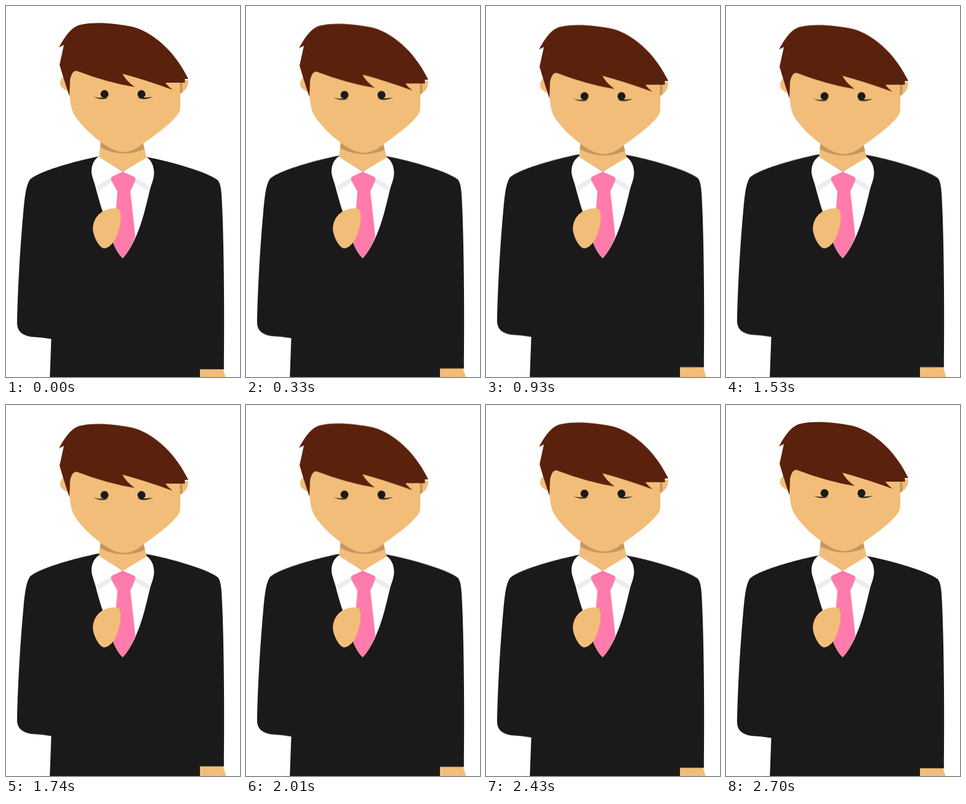
An HTML page for the animation above (3.6 s loop, 380 by 600 pixels).

```html
<!DOCTYPE html>
<html lang="en">
<head>
<meta charset="utf-8">
<title>Man in a suit</title>
<style>
  html, body { margin: 0; width: 100%; height: 100%; overflow: hidden; background: #fff; }
  svg { display: block; width: 380px; height: 600px; }
  .skin { fill: #f2bd78; }
  .shade { fill: #c29860; }
  .dark { fill: #1a1a1a; }
  .hair { fill: #5a210c; }
  .tie { fill: #ff7bac; }
  .fold { fill: #eeeded; }
  .jacket, .head { animation: breathe 3600ms infinite; }
  .jacket { --shift: -3.4px; }
  .head { --shift: 3.3px; }

  @keyframes breathe {
    0% { transform: translateY(0); animation-timing-function: cubic-bezier(.3, 0, .5, 1); }
    25.833% { transform: translateY(var(--shift)); animation-timing-function: linear; }
    42.5% { transform: translateY(var(--shift)); animation-timing-function: cubic-bezier(.35, 0, .75, .85); }
    75%, 100% { transform: translateY(0); }
  }
</style>
</head>
<body>
<svg viewBox="0 0 380 600">
  <defs>
    <path id="throat" d="M155 210L151 244L189.500 268L228.500 245L219.500 210Z"/>
    <clipPath id="neck"><use href="#throat"/></clipPath>
  </defs>

  <g class="jacket">
    <path class="skin" d="M315 580H350L358.500 606H315Z"/>
    <path class="dark" d="M152 243C110 251 48 269 38 282C32 292 30 312 28 335C23 390 19 460 18 513C18 526 27 533 41 535Q58 535.500 73.500 538.500L71 606H315V587.500H354C355 490 354 370 350 305C349 292 347 284 343 281C325 268 270 252 227 244Z"/>
  </g>

  <path fill="#fff" d="M151 243C143 248 138 258 139 270C140 278 145 289 147 299C151 313 154 325 158 335L174 383Q180 399 189.500 408Q201 396 211 373C221 351 227 325 233 300C235 290 240 282 240.500 270C240 257 236 250 228 244L189.500 268Z"/>
  <path class="fold" d="M147 291L171 277L172.500 284L149 300Z M208.500 277L233 291L231.500 299L207.500 285Z"/>
  <use class="skin" href="#throat"/>
  <path class="tie" d="M189.500 268L208 276Q211 278 210 282L202 300L210 373Q201 396 189.500 408Q180 399 174 383L181 300L171 282Q170 278 172 276Z"/>
  <path class="skin" d="M160 331C168 327 178 326 183 329C188 334 187 350 182 366C177 382 168 391 160 392C152 392 141 373 141 359C142 345 150 335 160 331Z"/>

  <g clip-path="url(#neck)">
    <path class="head shade" d="M150 215V227Q190 249 230 229V215Z"/>
  </g>

  <g class="head">
    <path class="skin" d="M93 114C87 119 86 127 91 132Q95 136 101 138V114Z M282 120H296C296 132 291 137 282 143Z"/>
    <path class="skin" d="M103 105V130C103 150 105 166 111 176C121 192 139 209 154 220C166 229 179 236 191 236C204 236 213 230 222 223C241 210 265 192 275 180C281 174 283 169 283 162V100Z"/>
    <path class="shade" d="M282.500 120H286.500V139L282.500 142Z"/>
    <path class="hair" d="M86 67C95 50 105 36 118 31C140 25 175 27 207 34C245 45 278 80 296 118H290.500V124H259Q262 129 270.500 135.500Q228 120 189 109.500Q195 121 209 131Q165 124 115 105C108 104 106 112 104 119L103 146Q93 116 87 95L94 63Z"/>
    <g class="dark">
      <circle cx="160" cy="142.500" r="6.500"/>
      <circle cx="220" cy="142.500" r="6.500"/>
      <path d="M141.500 146.500Q150 149.500 166 148.500Q155 153.500 141.500 146.500Z M238.500 147Q225 149 214 147.500Q222 153.500 238.500 147Z"/>
    </g>
  </g>
</svg>
</body>
</html>
```
